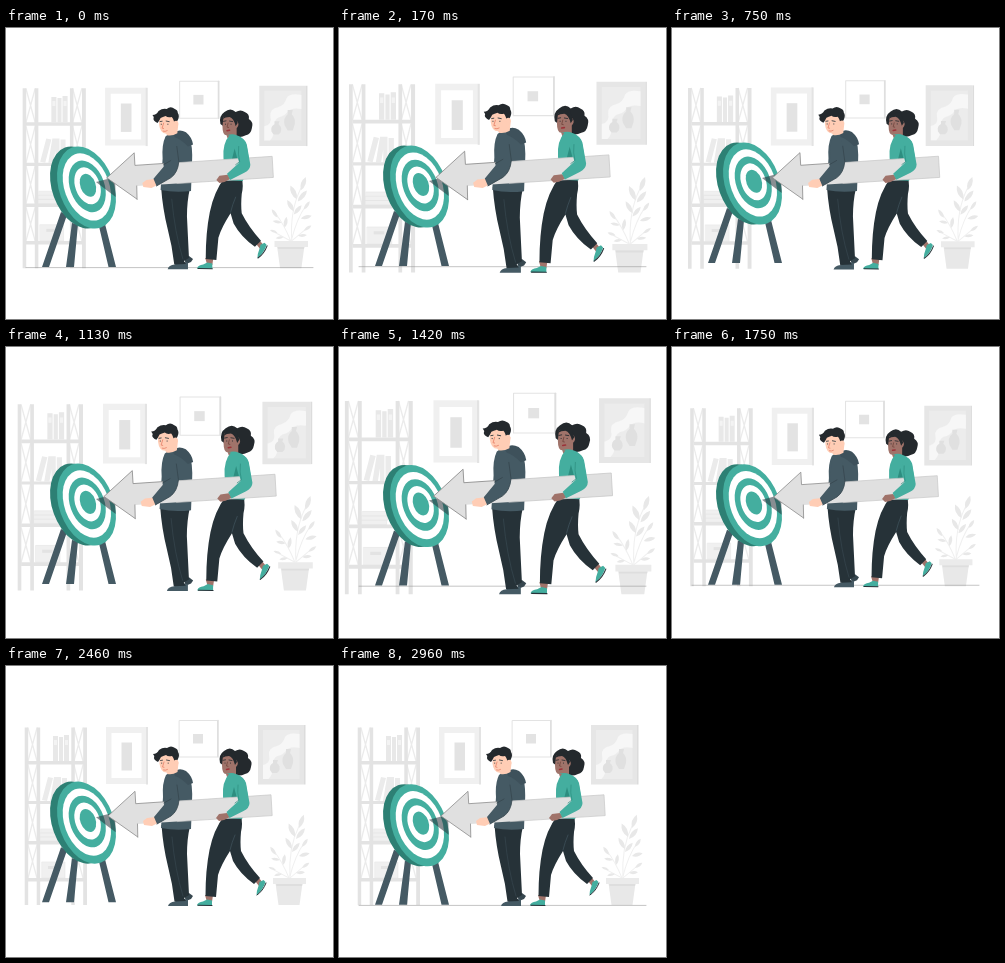
Write an HTML page that moves like this. It is 327 px wide and 291 px high and loops after 3 s.

```html
<!DOCTYPE html>
<html lang="en">
<head>
<meta charset="utf-8">
<title>Team carrying an arrow to a target</title>
<style>
html, body { margin: 0; width: 100%; height: 100%; overflow: hidden; background: #fff; }
svg { display: block; width: 100%; height: 100%; }
</style>
</head>
<body>
<svg viewBox="0 0 327 291" fill="none" stroke-linecap="round" stroke-linejoin="round">
  <g id="room">
    <g fill="#e3e3e3">
      <path id="braces" stroke="#ebebeb" stroke-width="1.3"/>
      <path fill="#e8e8e8" d="M47 70h5v25h-5zM53 71h4v24h-4zM58 69h5v26h-5z"/>
      <path fill="#f3f3f3" d="M48 74h3v5h-3zM59 74h3v5h-3z"/>
      <path fill="#ebebeb" d="M36 134l6-23 5 1-6 23zM44 135l4-24 5 0-4 24zM51 111h4v24h-4zM56 112h5v23h-5z"/>
      <path fill="#f0f0f0" stroke="#e6e6e6" stroke-width=".6" d="M35 163h22v4H35zM33 167h25v4H33zM34 171h23v4H34zM36 196h23v16H36z"/>
      <path d="M42 200h10v3H42z"/>
      <path d="M22 95h56v3.500H22zM22 135h56v3H22zM22 175h56v3.500H22zM22 212h56v3.500H22z"/>
      <path d="M18.700 61.500h3.500V239h-3.500zM30.700 61.500h3.500V239h-3.500zM65.300 61.500h3.500V239h-3.500zM77.200 61.500h3.800V239h-3.800z"/>
    </g>
    <path fill="#f0f0f0" d="M100 61h41v57h-41z"/>
    <path fill="#e3e3e3" d="M140 61h2v57.500h-2z"/>
    <path fill="#fff" d="M105.500 67h30v45h-30z"/>
    <path fill="#e3e3e3" d="M115.500 76.500h10.500v28h-10.500z"/>
    <path fill="#fff" stroke="#e3e3e3" d="M173.500 54.500h38v36.500h-38z"/>
    <path stroke="#dedede" stroke-width="1.5" d="M212 54.500V91"/>
    <path fill="#e3e3e3" d="M187 68h10v9.500h-10z"/>
    <path fill="#e6e6e6" d="M252 59h46v59.500h-46z"/>
    <path fill="#dcdcdc" d="M298 59h1.500v59.500H298z"/>
    <path fill="#ececec" d="M257 64h36.500v49H257z"/>
    <path fill="#f7f7f7" d="M257 113v-14q8-2 6-10-1-7 8-9 6-2 8-9 3-5 14.500-3v14q-9-2-13 2-3 5-9 6-5 2-4 9 0 9-5 14z"/>
    <path fill="#e0e0e0" d="M267 94h5l-1 3q4 3 2 8l-2 2h-5l-2-3q-1-5 3-7zM280 83h5l-1 4q4 4 3 10l-2 6h-5l-3-5q-2-7 3-11z"/>
    <g stroke="#f0f0f0" fill="#e8e8e8">
      <path d="M284 212q-2-30 9-52M284 210q5-20 14-33M283 212q-7-17-15-27M284 212l13-11M283 212l-15-8" fill="none"/>
      <g id="leaves" stroke="none"></g>
      <path stroke="none" d="M269.500 217h27l-3 22h-21z"/>
    </g>
    <path fill="#dedede" d="M270 218h26.500l-.5 2h-25.500z"/>
    <path fill="#ebebeb" d="M267 212h33v6h-33z"/>
  </g>

  <path id="floor" stroke="#888" stroke-width=".5" d="M20 239.600H307"/>

  <g id="target">
    <path fill="#455a64" d="M55 184l6 3-18 52h-7zM66 195l6 1-4 43h-8zM92 194l6-2 12 47h-7.500z"/>
    <g id="rings"></g>
    <path fill="#263238" opacity=".55" d="M90 154l19-5 .7 20-8-6z"/>
  </g>

  <g id="team">
    <!-- man: legs and torso -->
    <path fill="#37474f" d="M178 229l5-2 4 3-2 3-5 2z"/>
    <path fill="#455a64" d="M162 240q1-4 7-4.500l4-3 9 1v6.500h-20z"/>
    <path fill="#263238" d="M156 159l28 1q-3 13-3 28l2 41-5 3 2 3-11.500.500q-2-18-6.500-35-5-20-6.500-41.500z"/>
    <path stroke="#37474f" stroke-width=".7" d="M166 171q3 33 11 59"/>
    <path fill="#455a64" d="M160 109q5-4 12-5l11 5q4 9 3 27l-1 27q-16 2-30-1l2-31q-1-14 3-22z"/>
    <path fill="#3e515b" d="M167 106q6-5 13-1 6 5 7 12l-5 2q-7-7-13-9z"/>
    <!-- woman: legs -->
    <path fill="#a0736a" d="M199 229h8l-1 7h-5zM249 215l4-3 4 5-4 3z"/>
    <path fill="#44ae9f" d="M191 239q1-3 6-3.500l4-2 5 1v5h-15zM250.500 229q0-4 2-9l1-4 4-2 2 2q-3 9-9 13z"/>
    <path stroke="#263238" d="M192 239.300l14 .2M251 229q6-4 9-12"/>
    <path fill="#263238" d="M218 150l17-1q2 9 0 17-1 11 0 19 7 14 19 27l-6 6q-14-10-21-23l-3-10q-9 14-12 24l-2 22-10.500-1q0-26 4-46 4-20 14.500-34z"/>
    <path stroke="#455a64" stroke-width=".6" d="M224 184q2-8 5-15"/>
    <!-- woman: head and torso -->
    <path fill="#24292d" d="M214 97q-2-8 4-12 6-5 11 0 5-3 9 0 5 2 4 7 5 3 3 9-1 6-6 7-8 4-13-2z"/>
    <path fill="#a0736a" d="M217 90q5-4 11 1l3 4q2 3-1 6v10h-9l-1-3q-4 0-4-9z"/>
    <path fill="#24292d" d="M216 92q3-7 12-6l3 10-2 3q-2-8-6-9-4 0-7 2z"/>
    <path stroke="#24292d" stroke-width=".8" d="M217 94.300l2.500-.5M223 94l3 .5M219 97v.2M224.500 97v.2"/>
    <path stroke="#6c3f36" stroke-width=".7" d="M221.500 96l-1 4 1.500.3"/>
    <path stroke="#9c3238" stroke-width="1.500" d="M220.500 103.500l2.500-.4"/>
    <path fill="#44ae9f" d="M220 108q6-2 10 0 8 2 10 11l3 18-7 16-21-1q3-13 2-22-1-14 6-22z"/>
    <path fill="#2d8e80" d="M228 121l-4 16 8-1z"/>
    <!-- arrow -->
    <path fill="#e0e0e0" d="M102 150L129 125.300l.7 12.400L265 128.800l1.200 20.800-134.700 8.400.3 13z"/>
    <path stroke="#8c8c8c" stroke-width=".8" d="M131.800 171l-.3-13M102 150L129 125.300l.7 12.400 42-2.800M102 150l29.800 21"/>
    <path stroke="#c7c7c7" stroke-width=".7" d="M170 135.200L265 128.800l1.200 20.800-95 6"/>
    <!-- man: arm -->
    <path fill="#ffcdb5" d="M150 151l-9 1-4 3 1 4 8 1 8-4z"/>
    <path fill="#455a64" d="M160 110q7-3 10 4 2 11 3 20-1 11-8 16l-14 8-3-7 10-12z"/>
    <path stroke="#37474f" stroke-width=".8" d="M171 119l2 15q-1 11-8 16l-14 8M158 137l7-4"/>
    <!-- man: head -->
    <path fill="#ffcdb5" d="M153.500 90q7-5 16 0l3 7-1 9q-5 3-10 2l-1-1.500q-6 0-7-9z"/>
    <path fill="#24292d" d="M147 88q4 0 6-4 4-3 8-2 4-3 8 0 3 1 3 4 2 3 0 7l-3 5q-1-6-3-8-4 1-6-1-3 1-5 2-2 4-3 5-4-2-4-4 1-2-1-4z"/>
    <path fill="#ffcdb5" d="M167.500 95q4-3 5 1 0 4-4 4z"/>
    <path stroke="#263238" stroke-width=".8" d="M154.500 94.500l2-.3M160.500 94l3 .6M155.700 97v.3M162.200 97v.3"/>
    <path stroke="#e8836b" stroke-width=".8" d="M158 96l-1.500 5 1.500.3M157.500 104q2 .7 4-.5"/>
    <!-- woman: arm -->
    <path fill="#a0736a" d="M221 147l-8 1-3 4 3 3 5-1 6-3z"/>
    <path fill="#44ae9f" d="M231 112q6-3 9 5l3.500 20q0 5-6 8l-14 7-3-6 12-11q-4-11-1.500-23z"/>
    <path stroke="#2d8e80" stroke-width=".7" d="M232 119q-1 8 1 15l-4 3"/>
  </g>
</svg>
<script>
const LOOP = 3000;
const $ = id => document.getElementById(id);

// Shelf braces: crosses between each pair of posts
const bays = [[62, 95], [99, 135], [138, 175], [179, 212]];
$("braces").setAttribute("d", bays.map(([a, b]) =>
  [[22, 31], [68, 77]].map(([l, r]) => `M${l} ${a}L${r} ${b}M${r} ${a}L${l} ${b}`).join("")).join(""));

// Leaves: x, y, angle, length
const leaves = [
  [293, 162, 20, 14], [289, 171, -25, 15], [290, 173, 40, 14], [286, 183, -30, 13],
  [286, 186, 40, 12], [296, 181, 35, 10], [293, 190, 75, 11], [270, 189, -35, 10],
  [274, 194, -80, 9], [277, 199, 10, 11], [296, 202, 55, 9], [290, 207, 85, 9],
  [270, 204, -70, 8], [276, 208, -100, 8]
];
$("leaves").innerHTML = leaves.map(([x, y, turn, len]) =>
  `<path transform="translate(${x} ${y}) rotate(${turn})" d="M0 0Q${-len / 3} ${-len / 2} 0 ${-len}Q${len / 3} ${-len / 2} 0 0"/>`).join("");

// Target: thick rim, then rings from the outside in
const disc = (x, y, k, fill) =>
  `<ellipse transform="translate(${x} ${y}) rotate(-20)" rx="${27.3 * k}" ry="${42.5 * k}" fill="${fill}"/>`;
$("rings").innerHTML = disc(73.5, 159.5, 1, "#2d8074") +
  [1, .82, .63, .45, .28].map((k, i) =>
    disc(82.5 - 2 * k, 156.5 + 3 * k, k, i % 2 ? "#fff" : "#44ae9f")).join("");

// Double heartbeat: time, growth
const beat = [[0, .014], [300, .096], [860, 0], [1390, .096], [1630, .046], [1760, 0], [LOOP, 0]];
function growth(t) {
  const i = beat.findIndex(([end]) => t < end);
  const [t0, a] = beat[i - 1], [t1, b] = beat[i];
  return a + (b - a) * (t - t0) / (t1 - t0);
}

const zoom = (id, x, y, s) =>
  $(id).setAttribute("transform", `translate(${x} ${y}) scale(${s}) translate(${-x} ${-y})`);

function draw(now) {
  const t = now % LOOP;
  const s = 1 + growth(t);
  zoom("room", 162, 146.5, s);
  zoom("team", 184, 160, s);

  const lift = 4 * (1 - Math.abs(t % 1500 / 750 - 1));
  $("target").setAttribute("transform", `translate(0 ${-lift})`);
  $("floor").setAttribute("transform", `translate(0 ${-lift})`);
  $("floor").setAttribute("visibility", lift < 1.8 ? "visible" : "hidden");
}

const start = performance.now();
function tick() {
  draw(performance.now() - start);
  requestAnimationFrame(tick);
}
tick();
</script>
</body>
</html>
```
